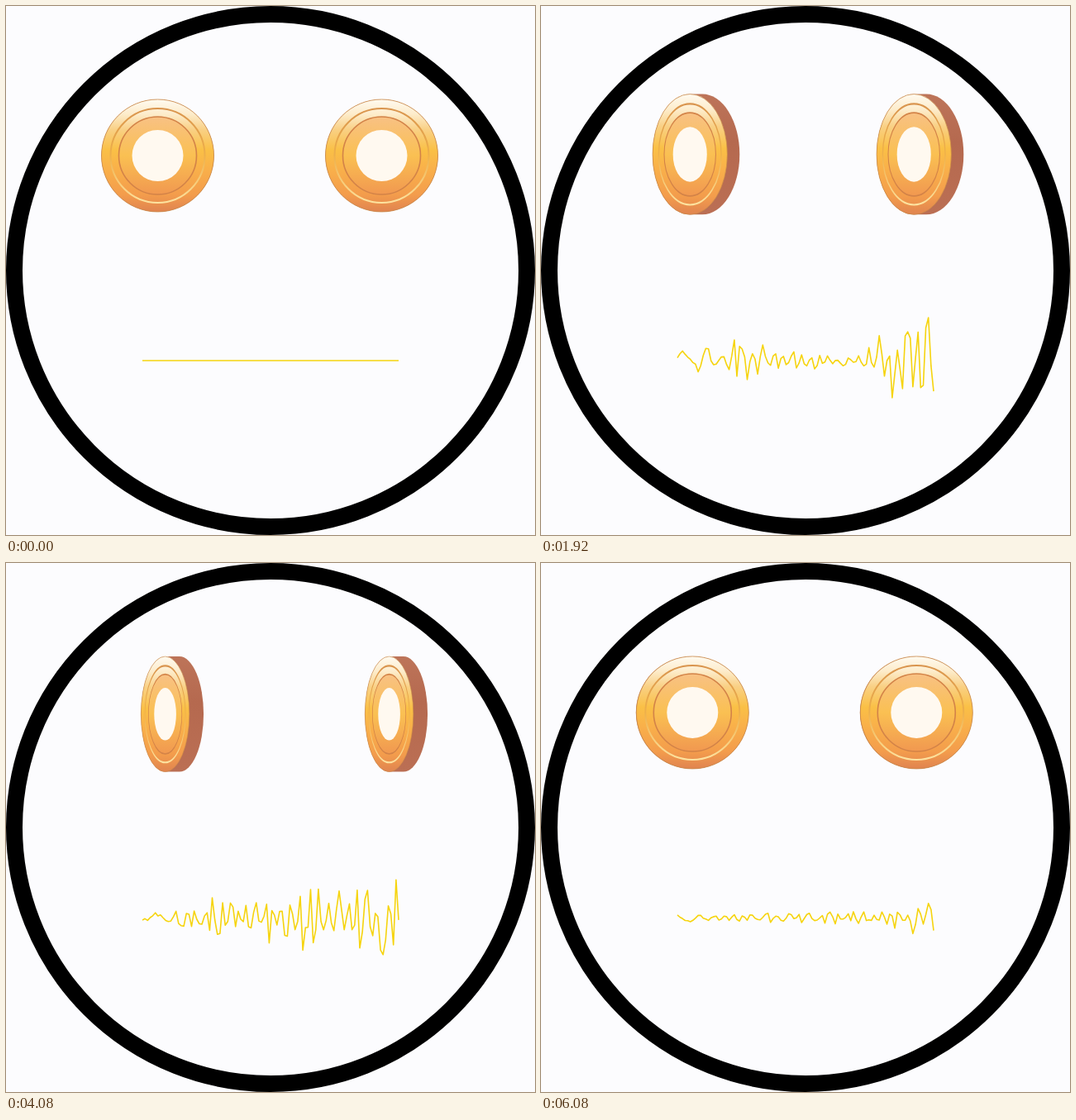
Animation, 640 px wide and 640 px high, one loop 6.16 s. Source, as an HTML page:

```html
<!DOCTYPE html>
<html lang="en">
<head>
<meta charset="utf-8">
<title>Coin face</title>
<style>
  html, body { margin: 0; width: 100%; height: 100%; overflow: hidden; background: #fcfcfe; }
  svg { display: block; width: 100%; height: 100%; }
</style>
</head>
<body>
<svg viewBox="0 0 640 640">
  <defs>
    <linearGradient id="gold" x1="0" y1="0" x2="0" y2="1">
      <stop offset="0" stop-color="#fffaf0"/>
      <stop offset=".13" stop-color="#fdeccb"/>
      <stop offset=".27" stop-color="#f9d084"/>
      <stop offset=".45" stop-color="#fac046"/>
      <stop offset=".62" stop-color="#f9b04a"/>
      <stop offset=".85" stop-color="#f39c4c"/>
      <stop offset="1" stop-color="#e08450"/>
    </linearGradient>
    <linearGradient id="inner" x1="0" y1="0" x2="0" y2="1">
      <stop offset="0" stop-color="#f8c184"/>
      <stop offset=".5" stop-color="#fac052"/>
      <stop offset="1" stop-color="#f19850"/>
    </linearGradient>
    <linearGradient id="rim" x1="0" y1="0" x2="0" y2="1">
      <stop offset="0" stop-color="#d9944e"/>
      <stop offset=".5" stop-color="#eeb04a"/>
      <stop offset="1" stop-color="#fde3a0"/>
    </linearGradient>
    <linearGradient id="side" x1="0" y1="0" x2="0" y2="1">
      <stop offset="0" stop-color="#bd7459"/>
      <stop offset=".4" stop-color="#b5694f"/>
      <stop offset="1" stop-color="#bb6f54"/>
    </linearGradient>
    <g id="coin">
      <path id="edge" fill="url(#side)"/>
      <g id="face">
        <circle r="68" fill="url(#gold)" stroke="#c98a48" stroke-width=".8"/>
        <circle r="57" fill="none" stroke="url(#rim)" stroke-width="2"/>
        <circle r="47" fill="url(#inner)" stroke="#d38348" stroke-width="1.6"/>
        <circle r="31" fill="#fff9f0"/>
      </g>
    </g>
  </defs>
  <circle cx="320" cy="320" r="310" fill="none" stroke="#000" stroke-width="20"/>
  <use href="#coin" x="183.5" y="181"/>
  <use href="#coin" x="454.5" y="181"/>
  <polyline id="mouth" fill="none" stroke="#f6d40e" stroke-width="1.6" stroke-linejoin="round"/>
</svg>
<script>
const LOOP = 6160, STEP = 1000 / 12, SPIN = 37 * STEP;
const POINTS = 100, LEFT = 165, WIDTH = 310, BASE = 429;
const edge = document.getElementById('edge');
const face = document.getElementById('face');
const mouth = document.getElementById('mouth');

// Loudness along the mouth, evenly spaced from left to right, at given times.
const voice = [
  { t: 0, amp: [0, 0, 0, 0, 0, 0, 0, 0, 0, 0, 0] },
  { t: 400, amp: [8, 5, 6, 8, 8, 8, 8, 8, 10, 20, 20] },
  { t: 1250, amp: [14, 6, 7, 7, 7, 8, 7, 7, 4, 42, 45] },
  { t: 2583, amp: [24, 28, 48, 50, 25, 20, 6, 9, 75, 98, 55] },
  { t: 3167, amp: [6, 17, 10, 9, 10, 68, 98, 95, 45, 50, 50] },
  { t: 4083, amp: [6, 9, 22, 27, 36, 34, 52, 45, 30, 50, 50] },
  { t: 5000, amp: [25, 18, 8, 9, 50, 80, 98, 70, 50, 55, 30] },
  { t: 6083, amp: [5, 6, 9, 12, 44, 44, 46, 43, 42, 44, 42] }
];

const clamp = v => Math.min(1, Math.max(0, v));
const mix = (a, b, k) => a + (b - a) * k;

function random(a, b) {
  const v = Math.sin(a * 127.1 + b * 311.7) * 43758.5453;
  return v - Math.floor(v);
}

function sample(list, u) {
  const i = Math.min(list.length - 2, Math.floor(u * (list.length - 1)));
  return mix(list[i], list[i + 1], u * (list.length - 1) - i);
}

function loudness(t) {
  const i = Math.max(1, voice.findIndex(v => v.t >= t));
  const a = voice[i - 1], b = voice[i];
  const k = clamp((t - a.t) / (b.t - a.t));
  return a.amp.map((v, j) => mix(v, b.amp[j], k));
}

function drawCoin(t) {
  const p = clamp((t % SPIN - 180) / 2930);
  const turn = Math.PI * (1 - Math.cos(Math.PI * p));
  const cos = Math.cos(turn), sin = Math.sin(turn);
  const front = cos >= 0;
  const lean = front ? -sin : sin;
  const r = 71 - 3 * cos;
  const rx = Math.max(.5, r * Math.abs(cos));
  const x = front ? -10 * lean : 3 + 8 * lean;
  const y = 2 * sin;
  const back = x - 19 * lean;
  const a = Math.min(x, back), b = Math.max(x, back);
  const arc = `A${rx} ${r} 0 0 1`;
  edge.setAttribute('d',
    `M${a} ${y + r}${arc} ${a} ${y - r}L${b} ${y - r}${arc} ${b} ${y + r}Z`);
  face.setAttribute('transform', `translate(${x} ${y}) scale(${rx / 68} ${r / 68})`);
}

function drawMouth(t, seed) {
  const amp = loudness(t);
  let phase = random(seed, 7) * 6.28, line = '';
  for (let i = 0; i < POINTS; i++) {
    const u = i / (POINTS - 1);
    phase += mix(.5, 1.7, clamp((u - .05) / .15)) * mix(.3, 1.7, random(i, seed));
    const swing = Math.sin(phase) * mix(.2, 1, random(seed + 90, i));
    line += `${(LEFT + u * WIDTH).toFixed(1)},${(BASE - swing * sample(amp, u)).toFixed(1)} `;
  }
  mouth.setAttribute('points', line);
}

function draw(now) {
  const n = Math.min(73, Math.floor((now % LOOP + 5) / STEP));
  drawCoin(n * STEP);
  drawMouth(n * STEP, n);
}

const start = performance.now();
function tick() {
  draw(performance.now() - start);
  requestAnimationFrame(tick);
}
tick();
</script>
</body>
</html>
```
